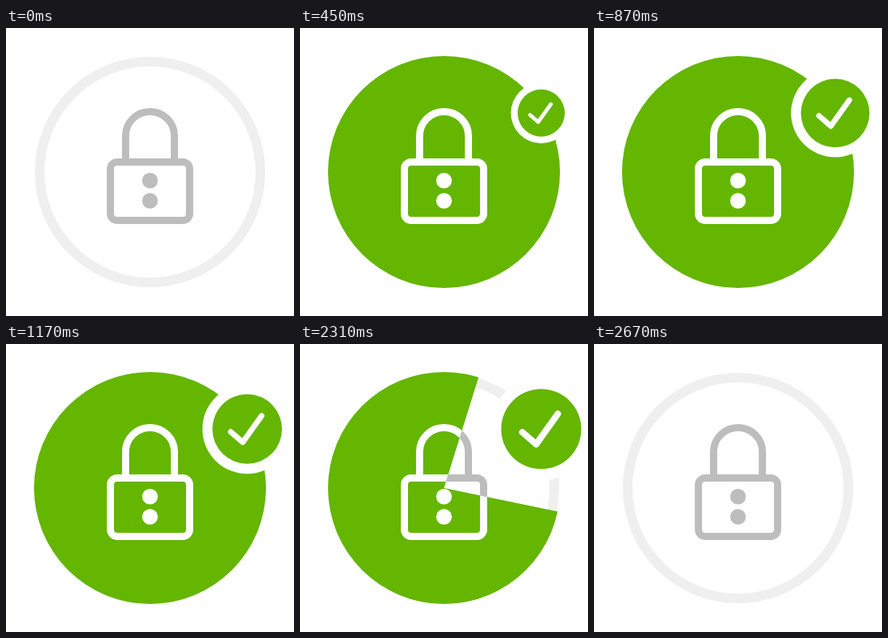
An HTML page with a canvas for the animation above (3600 ms loop, 360 by 360 pixels).

```html
<!DOCTYPE html>
<html lang="en">
<head>
<meta charset="utf-8">
<title>Lock confirmed</title>
<style>
  html, body { margin: 0; width: 100%; height: 100%; overflow: hidden; background: #fff; }
  canvas { display: block; width: 360px; height: 360px; }
</style>
</head>
<body>
<canvas id="stage"></canvas>
<script>
const LOOP = 3600, STEP = 30, TAU = Math.PI * 2;
const GREEN = '#64b600', GREY = '#bdbdbd', RING = '#efefef', WHITE = '#fff';

const canvas = document.getElementById('stage');
const ratio = window.devicePixelRatio || 1;
canvas.width = canvas.height = 360 * ratio;
const ctx = canvas.getContext('2d');
ctx.scale(ratio, ratio);
ctx.lineCap = ctx.lineJoin = 'round';

const progress = (t, start, length) => Math.min(1, Math.max(0, (t - start) / length));
const cubicOut = p => 1 - (1 - p) ** 3;
const cubicInOut = p => p < 0.5 ? 4 * p ** 3 : 1 - 4 * (1 - p) ** 3;
const backIn = p => p * p * (3.367 * p - 2.367);
const elasticOut = p => p <= 0 ? 0 : p >= 1 ? 1
  : 1 + 2 ** (-10 * p) * Math.sin((p - 0.075) * TAU / 0.3);

function disc(x, y, r, color) {
  ctx.fillStyle = color;
  ctx.beginPath();
  ctx.arc(x, y, r, 0, TAU);
  ctx.fill();
}

function drawLock(color) {
  ctx.strokeStyle = color;
  ctx.lineWidth = 9;
  ctx.beginPath();
  ctx.roundRect(130.5, 167.5, 99, 73, 8.5);
  ctx.moveTo(149.5, 166);
  ctx.lineTo(149.5, 135);
  ctx.arc(180, 135, 30.5, Math.PI, 0);
  ctx.lineTo(210.5, 166);
  ctx.stroke();
  disc(180, 190.8, 9.8, color);
  disc(180, 216, 9.8, color);
}

// Angles in degrees, clockwise from the top.
function drawFill(from, to) {
  const sweep = to - from;
  if (sweep <= 0) return;
  const start = from * TAU / 360 - TAU / 4;
  ctx.save();
  if (sweep < 360) {
    ctx.beginPath();
    ctx.moveTo(180, 180);
    ctx.arc(180, 180, 200, start, start + sweep * TAU / 360);
    ctx.closePath();
    ctx.clip();
  }
  disc(180, 180, 145, GREEN);
  drawLock(WHITE);
  ctx.restore();
}

function drawBadge(scale) {
  if (scale <= 0) return;
  ctx.save();
  ctx.translate(301.5, 106.3);
  ctx.scale(scale, scale);
  disc(0, 0, 56, WHITE);
  disc(0, 0, 43.5, GREEN);
  ctx.strokeStyle = WHITE;
  ctx.lineWidth = 7;
  ctx.beginPath();
  ctx.moveTo(-20.5, 3.5);
  ctx.lineTo(-5.5, 16.5);
  ctx.lineTo(18, -16.5);
  ctx.stroke();
  ctx.restore();
}

function draw(t) {
  ctx.fillStyle = WHITE;
  ctx.fillRect(0, 0, 360, 360);

  ctx.strokeStyle = RING;
  ctx.lineWidth = 12;
  ctx.beginPath();
  ctx.arc(180, 180, 138, 0, TAU);
  ctx.stroke();
  drawLock(GREY);

  const fill = cubicOut(progress(t, 7, 400));
  const clear = cubicInOut(progress(t, 2110, 515));
  const turn = 74 * clear;
  drawFill(turn + 360 * clear, turn + 360 * fill);

  const grow = elasticOut(progress(t, 411, 750));
  const shrink = backIn(progress(t, 2110, 550));
  drawBadge(grow * (1 - shrink));
}

const origin = performance.now();
function tick() {
  const t = (performance.now() - origin) % LOOP;
  draw(Math.floor(t / STEP) * STEP);
  requestAnimationFrame(tick);
}
tick();
</script>
</body>
</html>
```
